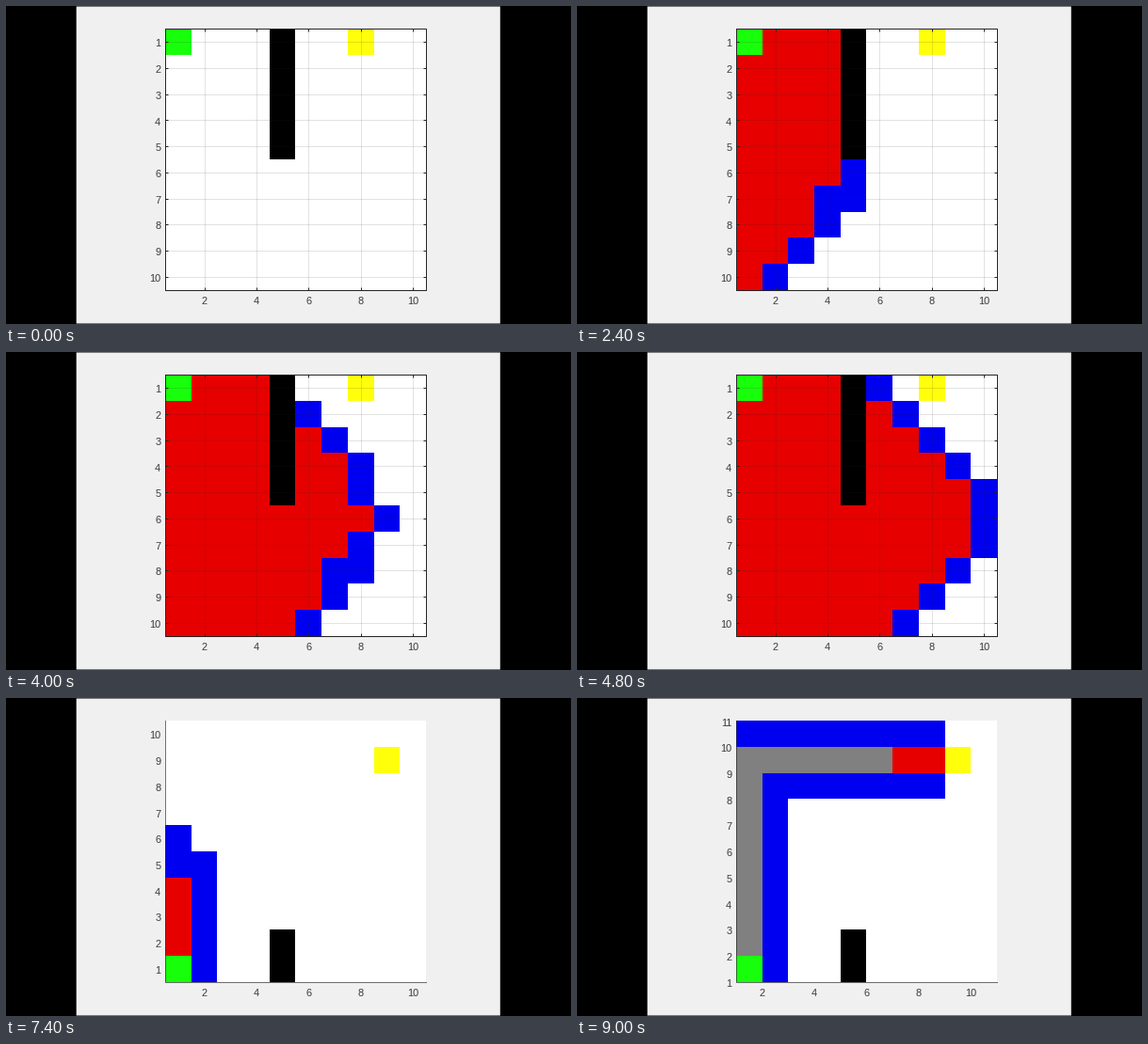
A matplotlib script for the animation above (9100 ms loop, 600 by 338 pixels).

```python
import numpy as np
import matplotlib.pyplot as plt
from matplotlib.animation import FuncAnimation
from matplotlib.collections import LineCollection
from matplotlib.colors import ListedColormap
from matplotlib.patches import Rectangle

W, H, DPI = 600, 338, 100
N = 10
LEFT, RIGHT, TOP, BOTTOM = 169.3, 446.0, 24.3, 301.6
DX, DY = (RIGHT - LEFT) / N, (BOTTOM - TOP) / N
INK = "#262626"
FREE, WALL, CLOSED, OPEN, START, GOAL, PATH = range(7)
COLORS = ["#ffffff", "#000000", "#e60000", "#0000f0", "#18ff0c", "#ffff0c", "#808080"]

FRAMES, INTERVAL = 91, 100
SECOND_RUN = 104  # step at which the second search begins


def neighbours(cell):
    x, y = cell
    for c in ((x + 1, y), (x - 1, y), (x, y + 1), (x, y - 1)):
        if 1 <= c[0] <= N and 1 <= c[1] <= N:
            yield c


def search(walls, start, goal, cost):
    """Return the order of expanded cells and the route between the ends."""
    dist, parent = {start: 0}, {}
    frontier, order = {start}, []
    while True:
        cell = min(frontier, key=lambda c: (cost(dist[c], c), c))
        if cell == goal:
            break
        frontier.remove(cell)
        order.append(cell)
        for c in neighbours(cell):
            if c not in walls and c not in order:
                dist[c] = dist[cell] + 1
                parent[c] = cell
                frontier.add(c)
    route, cell = [], parent[goal]
    while cell != start:
        route.append(cell)
        cell = parent[cell]
    return order, route[::-1]


class Run:
    def __init__(self, wall_height, goal, cost):
        self.start, self.goal = (1, 1), goal
        self.walls = {(5, y) for y in range(1, wall_height + 1)}
        self.order, self.route = search(self.walls, self.start, goal, cost)

    def grid(self, step):
        """Return the map after a number of steps and whether the route shows."""
        g = np.full((N, N), FREE)

        def paint(cells, value):
            for x, y in cells:
                g[y - 1, x - 1] = value

        done = self.order[:step]
        marked = max(0, step - len(self.order))
        for cell in done:
            paint(neighbours(cell), OPEN)
        # the cell being expanded stays blue until the next step
        paint(done if marked else done[:-1], CLOSED)
        paint(self.route[:marked], PATH)
        paint(self.walls, WALL)
        paint([self.start], START)
        paint([self.goal], GOAL)
        return g, marked > 0


dijkstra = Run(5, (8, 1), lambda d, c: d)
greedy = Run(2, (9, 9), lambda d, c: abs(9 - c[0]) + abs(9 - c[1]))

fig = plt.figure(figsize=(W / DPI, H / DPI), dpi=DPI, facecolor="black")
ax = fig.add_axes([0, 0, 1, 1])
ax.axis("off")
ax.add_patch(Rectangle((74.7, 0.5), 450.1, 337, fc="#f0f0f0", lw=0, snap=False))
image = ax.imshow(np.zeros((N, N)), cmap=ListedColormap(COLORS), vmin=-0.5, vmax=6.5,
                  extent=(LEFT, RIGHT, BOTTOM, TOP), interpolation="nearest",
                  aspect="auto", zorder=1)
ax.set_xlim(0, W)
ax.set_ylim(H, 0)

PX = 72 / DPI
mesh = ax.add_collection(LineCollection([], colors=INK, alpha=0.13, linewidths=PX, zorder=2))
ticks = ax.add_collection(LineCollection([], colors=INK, linewidths=PX, zorder=3))
frame_line, = ax.plot([], [], color=INK, lw=PX, zorder=3)

font = dict(family="Liberation Sans", size=11 * PX, color="#3a3a3a")
x_labels = [ax.text(0, 314.2, str(v), ha="center", va="center", **font)
            for v in range(2, N + 1, 2)]
y_labels = [ax.text(164.3, 0, str(v), ha="right", va="center", **font)
            for v in range(1, N + 2)]


def set_axes(on_edges, flipped):
    shift = 1 if on_edges else 0.5
    xs = [LEFT + (v - shift) * DX for v in range(2, N + 1, 2)]
    ys = [TOP + (v - shift) * DY for v in range(1, N + 2)]
    if flipped:
        ys = [TOP + BOTTOM - y for y in ys]
    for label, x in zip(x_labels, xs):
        label.set_x(x - 0.3)
    for label, y in zip(y_labels, ys):
        label.set_y(y + 2.2)
    y_labels[-1].set_visible(on_edges)

    frame_line.set_alpha(0.65 if flipped else 1)
    if flipped:
        mesh.set_segments([])
        ticks.set_segments([])
        frame_line.set_data([LEFT, LEFT, RIGHT], [TOP, BOTTOM, BOTTOM])
        return
    ys = ys if on_edges else ys[:-1]
    mesh.set_segments([[(x, TOP), (x, BOTTOM)] for x in xs]
                      + [[(LEFT, y), (RIGHT, y)] for y in ys])
    ticks.set_segments([[(x, e), (x, e + d)] for x in xs for e, d in ((TOP, 3), (BOTTOM, -3))]
                       + [[(e, y), (e + d, y)] for y in ys for e, d in ((LEFT, 3), (RIGHT, -3))])
    frame_line.set_data([LEFT, RIGHT, RIGHT, LEFT, LEFT], [TOP, TOP, BOTTOM, BOTTOM, TOP])


def update(i):
    step = max(0, 3 * (i - 1) // 2)  # three steps every two pictures
    second = step >= SECOND_RUN
    if second:
        grid, on_edges = greedy.grid(step - SECOND_RUN)
        grid = grid[::-1]
    else:
        grid, on_edges = dijkstra.grid(step)
    image.set_data(grid)
    set_axes(on_edges, second)
    return []


anim = FuncAnimation(fig, update, frames=FRAMES, interval=INTERVAL, repeat=True,
                     repeat_delay=0, blit=False)
plt.show()
```
